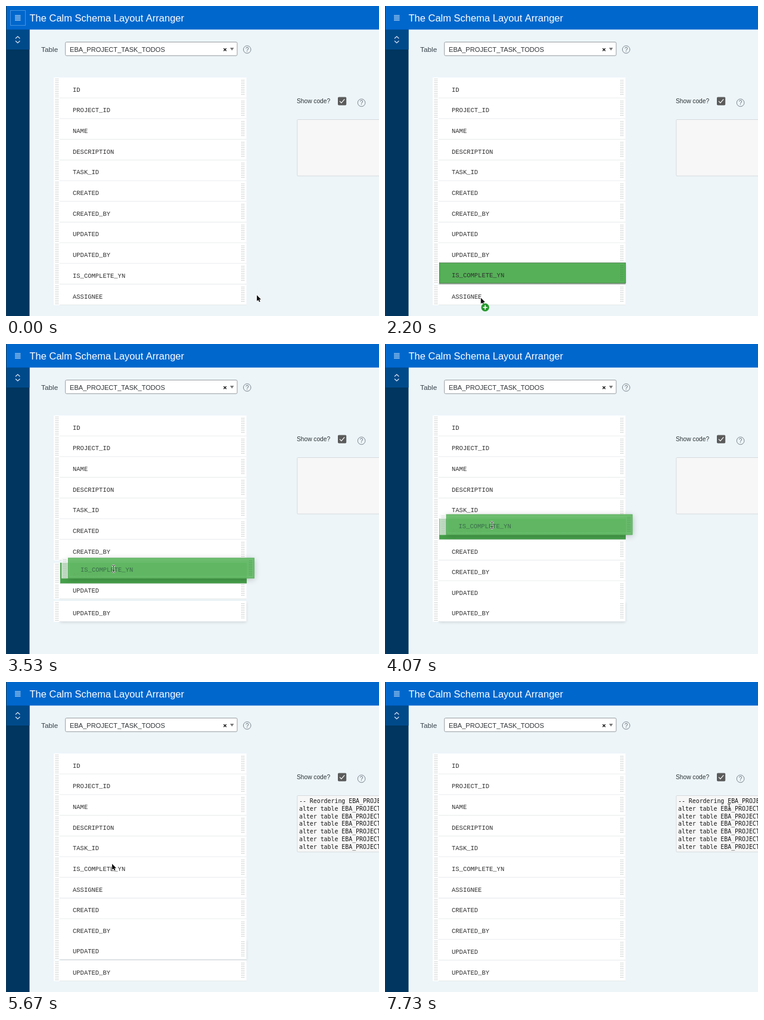
An HTML page with a canvas that plays this animation: 626 px wide and 520 px high, repeating every 7800 ms.

```html
<!DOCTYPE html>
<html lang="en">
<head>
<meta charset="utf-8">
<title>Column arranger</title>
<style>
html, body { margin: 0; width: 100%; height: 100%; overflow: hidden; background: #edf5f9; }
canvas { display: block; width: 626px; height: 520px; }
</style>
</head>
<body>
<canvas id="stage"></canvas>
<script>
const W = 626, H = 520, LOOP = 7800, FPS = 15;
const canvas = document.getElementById('stage');
const ctx = canvas.getContext('2d');
const ratio = window.devicePixelRatio || 1;
canvas.width = W * ratio;
canvas.height = H * ratio;

const SANS = '"Liberation Sans", Arial, sans-serif';
const ROW_FONT = '10.5px "Liberation Mono", monospace';
const CODE_FONT = '9.9px "DejaVu Sans Mono", monospace';
const LIST = { x: 80, y: 120, width: 323.5, pitch: 34.7 };
const TABLE = 'EBA_PROJECT_TASK_TODOS';
const COLUMNS = ['ID', 'PROJECT_ID', 'NAME', 'DESCRIPTION', 'TASK_ID', 'CREATED',
  'CREATED_BY', 'UPDATED', 'UPDATED_BY', 'IS_COMPLETE_YN', 'ASSIGNEE'];
const DRAGGED = 9, COMPANION = 10, INSERT_AT = 5;
const DRAG_START = 3260, DROP = 5130, LANDED = 5330, CODE_AT = 5460;
const GRAB = { x: 168, y: 449 };

// Keys: time, x, y
const CURSOR_PATH = [
  [67, 421, 485], [800, 163, 464], [860, 163, 464], [1133, 150.5, 455],
  [1530, 150.5, 455], [1933, 160, 490], [2530, 162, 489], [2867, 168, 447],
  [3133, 168, 447], [3200, 169, 441], [3533, 181, 376.6], [3933, 180, 306],
  [4067, 179.5, 303.6], [5130, 179.5, 303.6], [5400, 178, 305], [7440, 178, 305], [7733, 577, 210]
];
// Keys: time, slot of the companion row while dragging
const GAP_PATH = [[3200, 9], [3267, 8.7], [3533, 7.13], [3933, 5.2], [4067, 5], [DROP, 5], [LANDED, 6]];

const clamp = v => Math.max(0, Math.min(1, v));
const progress = (t, from, to) => clamp((t - from) / (to - from));
const smooth = v => v * v * (3 - 2 * v);
const mix = (a, b, v) => a + (b - a) * v;

function follow(path, t, ease = v => v) {
  const next = path.findIndex(key => key[0] >= t);
  if (next === 0) return path[0].slice(1);
  if (next < 0) return path[path.length - 1].slice(1);
  const a = path[next - 1], b = path[next];
  const v = ease(progress(t, a[0], b[0]));
  return a.slice(1).map((value, i) => mix(value, b[i + 1], v));
}

function rect(x, y, w, h, fill) {
  ctx.fillStyle = fill;
  ctx.fillRect(x, y, w, h);
}

function text(value, x, y, font, fill) {
  ctx.font = font;
  ctx.fillStyle = fill;
  ctx.fillText(value, x, y);
}

function line(points, stroke, width = 1) {
  ctx.beginPath();
  points.forEach(([x, y]) => ctx.lineTo(x, y));
  ctx.strokeStyle = stroke;
  ctx.lineWidth = width;
  ctx.stroke();
}

function dottedFrame(x, y, w, h, stroke) {
  ctx.setLineDash([1, 1]);
  ctx.strokeStyle = stroke;
  ctx.lineWidth = 1;
  ctx.strokeRect(x, y, w, h);
  ctx.setLineDash([]);
}

function box(x, y, w, h, fill, stroke, radius = 0) {
  ctx.beginPath();
  ctx.roundRect(x, y, w, h, radius);
  ctx.fillStyle = fill;
  ctx.fill();
  ctx.strokeStyle = stroke;
  ctx.lineWidth = 1;
  ctx.stroke();
}

function help(x, y) {
  ctx.beginPath();
  ctx.arc(x, y, 6.3, 0, Math.PI * 2);
  ctx.strokeStyle = '#7c868c';
  ctx.lineWidth = 1;
  ctx.stroke();
  ctx.textAlign = 'center';
  text('?', x, y + 3.6, '10px ' + SANS, '#6b757b');
  ctx.textAlign = 'left';
}

function drawPage(t) {
  rect(0, 0, W, H, '#edf5f9');
  rect(0, 39, 39.5, 481, '#00365f');
  rect(0, 39, 39.5, 34, '#004a8a');
  rect(0, 0, W, 39.5, '#0067cd');
  rect(0, 0, 1, H, '#123a5c');

  if (t < 1460) dottedFrame(7.5, 7.5, 25, 25, '#8fc0ee');
  for (let i = 0; i < 4; i++) rect(15, 15.5 + i * 2.6, 9.5, 1, '#e6f1fb');
  text('The Calm Schema Layout Arranger', 39.5, 26, '16.5px ' + SANS, '#fff');
  line([[16, 54.5], [19.7, 51], [23.4, 54.5]], '#dce8f2', 1.2);
  line([[16, 58.5], [19.7, 62], [23.4, 58.5]], '#dce8f2', 1.2);

  text('Table', 59, 77.3, '11.8px ' + SANS, '#38434a');
  box(99.7, 60.5, 288.3, 22.8, '#fff', '#989da1', 2);
  text(TABLE, 107, 77, '11.1px ' + SANS, '#303437');
  line([[365.3, 71], [369.8, 75.5]], '#222', 1.5);
  line([[369.8, 71], [365.3, 75.5]], '#222', 1.5);
  ctx.beginPath();
  ctx.moveTo(376, 70);
  ctx.lineTo(382.5, 70);
  ctx.lineTo(379.25, 74.7);
  ctx.fillStyle = '#777';
  ctx.fill();
  help(404.7, 73);

  text('Show code?', 488, 163.2, '10.2px ' + SANS, '#2c3336');
  box(557.5, 153.2, 13.2, 12.8, '#5b5b5b', '#555', 1);
  line([[560, 159.7], [562.8, 162.6], [568.2, 156.3]], '#fff', 1.2);
  help(596.6, 162.3);
  box(488.8, 190.5, 150, 94.5, '#f7f7f7', '#d7dadc', 1);
  if (t >= CODE_AT) {
    for (let i = 0; i < 7; i++) {
      const code = (i ? 'alter table ' : '-- Reordering ') + TABLE;
      text(code, 492, 203 + i * 12.75, CODE_FONT, '#151515');
    }
  }
}

function dots(x, y, height, color) {
  const left = Math.round(x), top = Math.round(y);
  for (let dy = 0; dy < height; dy += 3) {
    for (let dx = 0; dx < 6; dx += 2) rect(left + dx, top + dy, 1, 1, color);
  }
}

function drawRow(name, y, { green = 0, color = '#56b058', framed = true, separator = true } = {}) {
  const { x, width, pitch } = LIST;
  rect(x, y, width, pitch, '#fff');
  dots(x + 3, y + 1.5, pitch - 2, '#a9acae');
  if (separator) rect(x + 10, y + pitch - 0.9, width - 10, 1, '#e3e6e8');
  if (green > 0) {
    ctx.globalAlpha = green;
    rect(91, y - 0.5, 313, pitch, color);
    ctx.globalAlpha = Math.min(1, green * 2.5);
    if (framed) dottedFrame(91.5, y - 0.3, 312.3, pitch - 0.5, '#3c4a3d');
    ctx.globalAlpha = 1;
  }
  dots(x + 315, y + 4, 27, green > 0.5 ? '#438546' : '#a9acae');
  text(name, 112, y + 23.5, ROW_FONT, '#303030');
}

function drawDragged(dx, dy) {
  const { pitch } = LIST;
  const x = 91 + dx, y = 431 + dy;
  ctx.save();
  ctx.globalAlpha = 0.94;
  ctx.shadowColor = 'rgba(0,0,0,.24)';
  ctx.shadowBlur = 10 * ratio;
  ctx.shadowOffsetY = 2 * ratio;
  rect(x, y, 313, pitch, '#63ba65');
  ctx.restore();
  ctx.save();
  ctx.globalAlpha = 0.7;
  rect(x - 11, y, 11, pitch, '#f6f8f7');
  dots(x - 8, y + 2, pitch - 3, '#a9b0ab');
  dots(x + 304, y + 4, 27, '#468b49');
  dottedFrame(x + 0.5, y + 0.5, 312, pitch - 1, '#55a058');
  dottedFrame(x + 2.5, y + 3.5, 308, pitch - 7, '#80c882');
  ctx.globalAlpha = 0.85;
  text(COLUMNS[DRAGGED], x + 21, y + 23.5, ROW_FONT, '#345f48');
  ctx.restore();
}

function slotY(slot, lifted) {
  const lift = lifted ? 1.2 * Math.max(0, 1 - Math.abs(slot - 9)) : 0;
  return LIST.y + slot * LIST.pitch - lift;
}

function drawList(t, cursor) {
  const moved = t >= DRAG_START;
  const dragging = moved && t < LANDED;
  const lifted = t >= 1395 && t < 7600;
  const drop = smooth(progress(t, DROP, LANDED));
  const gap = follow(GAP_PATH, t)[0];
  const fade = 1 - progress(t, 5333, 5600);
  const green = {
    [DRAGGED]: progress(t, 1333, 1600) * fade,
    [COMPANION]: progress(t, 2467, 2733) * fade
  };

  const slotOf = i => {
    if (!moved) return i;
    if (i === DRAGGED) return INSERT_AT;
    if (i === COMPANION) return gap;
    if (i < INSERT_AT) return i;
    return i + clamp(i + 1 - mix(gap, INSERT_AT, drop)) + drop;
  };

  if (lifted) {
    ctx.save();
    ctx.shadowColor = 'rgba(0,0,0,.16)';
    ctx.shadowBlur = 5 * ratio;
    ctx.shadowOffsetY = 1.5 * ratio;
    rect(91, slotY(9, true), 312, LIST.pitch, '#fff');
    ctx.restore();
  }

  COLUMNS.forEach((name, i) => {
    if (i === COMPANION || (i === DRAGGED && dragging)) return;
    const slot = slotOf(i);
    const separator = !(lifted && Math.abs(slot - 8) < 0.05);
    drawRow(name, slotY(slot, lifted), { green: green[i], separator });
  });
  drawRow(COLUMNS[COMPANION], slotY(slotOf(COMPANION), lifted), {
    green: green[COMPANION],
    color: dragging ? '#46a04a' : '#56b058',
    framed: !dragging
  });
  if (lifted && !dragging) rect(91, 465.3, 312.5, 1.5, t < 2467 ? '#8f9a90' : '#dce1e3');

  if (dragging) {
    const target = slotY(INSERT_AT, false) - 431;
    drawDragged(mix(cursor[0] - GRAB.x, 0, drop), mix(cursor[1] - GRAB.y, target, drop));
  }
}

function drawArrow(x, y) {
  const shape = [[0, 0], [0, 10], [2.3, 8], [4, 11.6], [5.7, 10.8], [4.1, 7.4], [7.1, 7.2]];
  ctx.beginPath();
  shape.forEach(([dx, dy]) => ctx.lineTo(x + dx, y + dy));
  ctx.closePath();
  ctx.lineJoin = 'round';
  ctx.strokeStyle = '#fff';
  ctx.lineWidth = 1.5;
  ctx.stroke();
  ctx.fillStyle = '#111';
  ctx.fill();
  ctx.lineJoin = 'miter';
}

function drawPlus(x, y) {
  ctx.beginPath();
  ctx.arc(x, y, 7, 0, Math.PI * 2);
  ctx.fillStyle = '#23962b';
  ctx.fill();
  ctx.strokeStyle = '#d5ecd6';
  ctx.lineWidth = 0.8;
  ctx.stroke();
  rect(x - 3.8, y - 0.8, 7.6, 1.6, '#fff');
  rect(x - 0.8, y - 3.8, 1.6, 7.6, '#fff');
}

function drawBeam(px, py) {
  const x = Math.floor(px) + 0.5, y = Math.round(py);
  [['rgba(255,255,255,.8)', 2.6], ['#222', 1]].forEach(([color, width]) => {
    line([[x, y - 5], [x, y + 5]], color, width);
    line([[x - 2.5, y - 6], [x, y - 4.8], [x + 2.5, y - 6]], color, width);
    line([[x - 2.5, y + 6], [x, y + 4.8], [x + 2.5, y + 6]], color, width);
    line([[x - 1.5, y + 2.5], [x + 1.5, y + 2.5]], color, width);
  });
}

function drawCursor(t, [x, y]) {
  const adding = t >= 2200 && t < DRAG_START;
  const arrow = t < 660 || adding || (t >= 5190 && t < 7650);
  if (!arrow) return drawBeam(x, y);
  drawArrow(x, y);
  if (adding) drawPlus(x + 7.3, y + 16);
}

function render(now) {
  // The picture advances in steps of a fifteenth of a second.
  const t = Math.floor(((now % LOOP) + 4) * FPS / 1000) * 1000 / FPS;
  ctx.setTransform(ratio, 0, 0, ratio, 0, 0);
  const cursor = follow(CURSOR_PATH, t, smooth);
  drawPage(t);
  drawList(t, cursor);
  drawCursor(t, cursor);
}

const start = performance.now();
function tick() {
  render(performance.now() - start);
  requestAnimationFrame(tick);
}
tick();
</script>
</body>
</html>
```
